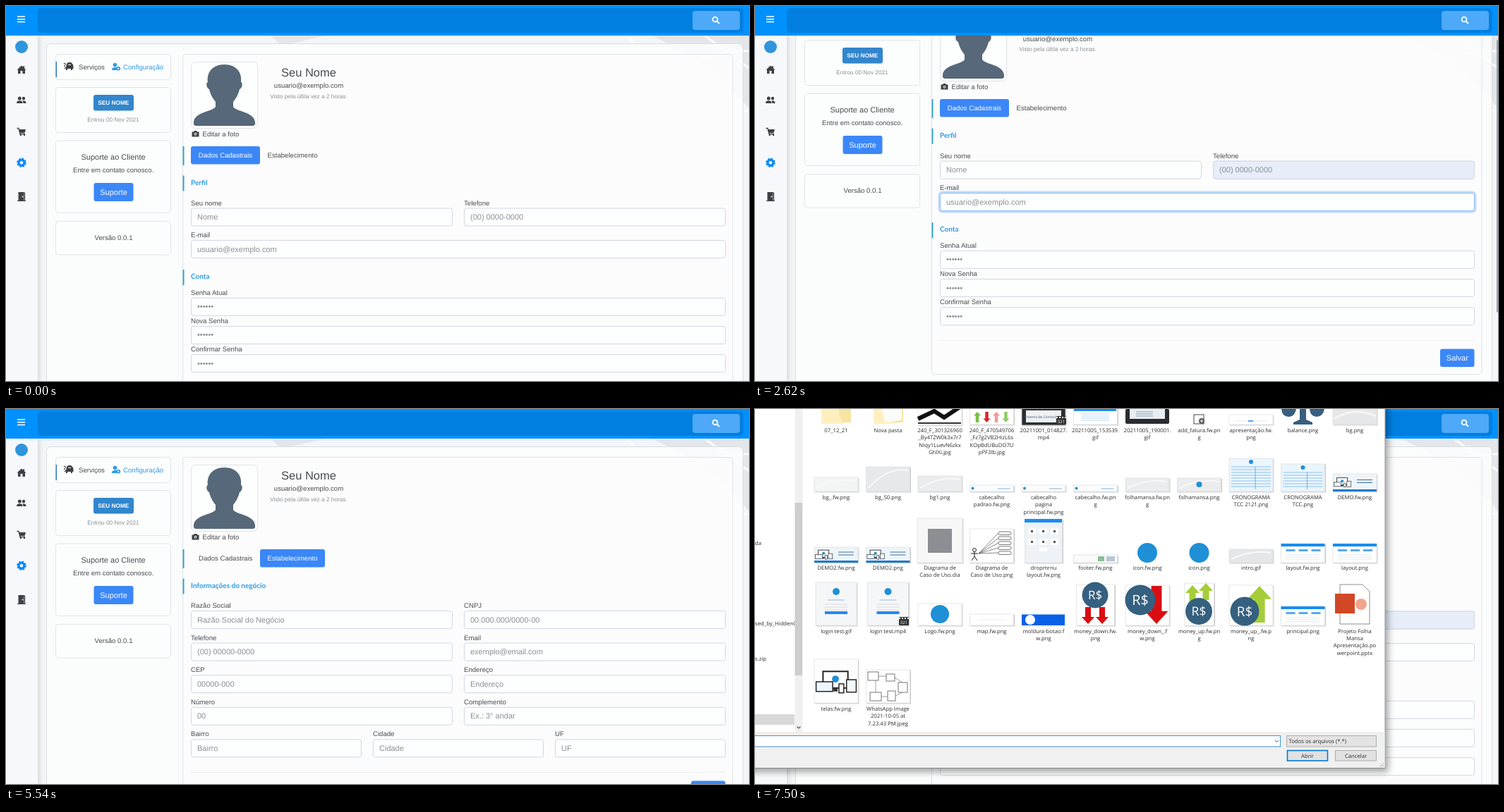
Animation, 1053 px wide and 532 px high, one loop 8000 ms. Source, as an HTML page:

```html
<!DOCTYPE html>
<html lang="pt-BR">
<head>
<meta charset="utf-8">
<title>Configuração</title>
<style>
html, body { margin: 0; width: 100%; height: 100%; overflow: hidden; background: #f4f5f7; }
svg { display: block; width: 1053px; height: 532px; font-family: "Liberation Sans", Arial, sans-serif; text-rendering: geometricPrecision; }
.head { font-family: Lato, sans-serif; font-weight: 700; }
.win { font-family: "Open Sans", "Noto Sans", sans-serif; }
</style>
</head>
<body>
<svg id="stage" viewBox="0 0 1053 532"></svg>
<script>
const LOOP = 8000;
const INK = '#494c50', MUTED = '#8b9095', BLUE = '#3b87f8', SKY = '#2e9be6', ICON = '#3d4146';

// Markup helpers
const rect = (x, y, w, h, fill, more = '') => `<rect x="${x}" y="${y}" width="${w}" height="${h}" fill="${fill}" ${more}/>`;
const path = (d, fill, more = '') => `<path d="${d}" fill="${fill}" ${more}/>`;
const line = (d, color, w = 1, more = '') => path(d, 'none', `stroke="${color}" stroke-width="${w}" ${more}`);
const disc = (x, y, r, fill, more = '') => `<circle cx="${x}" cy="${y}" r="${r}" fill="${fill}" ${more}/>`;
const text = (x, y, s, size = 9.625, fill = INK, more = '') => `<text x="${x}" y="${y}" font-size="${size}" fill="${fill}" ${more}>${s}</text>`;
const mid = (x, y, s, size, fill, more = '') => text(x, y, s, size, fill, 'text-anchor="middle" ' + more);
const group = (id, body, more = '') => `<g id="${id}" ${more}>${body}</g>`;
const box = (x, y, w, h) => rect(x + .5, y + .5, w, h, '#fcfdfd', 'rx="4" stroke="#e1e5e9"');
const bar = (y, h) => rect(250.5, y, 2, h, '#36a3d0');
const button = (x, y, w, h, s, size = 11) => rect(x, y, w, h, BLUE, 'rx="3"') + mid(x + w / 2, y + h / 2 + size * .35, s, size, '#fff');

const input = (x, y, w, hint, fill = '#fdfefe') =>
  rect(x + .5, y + .5, w - 1, 25, fill, 'rx="3" stroke="#d0d7e6"') + text(x + 9, y + 16.5, hint, 11, MUTED);
const field = (x, y, w, label, hint) => text(x, y - 4, label) + input(x, y, w, hint);
const ring = (id, x, y, w) => group(id,
  rect(x - 1, y - 1, w + 2, 28, 'none', 'rx="4.5" stroke="#c3dbfd" stroke-width="3"') +
  rect(x + .5, y + .5, w - 1, 25, 'none', 'rx="3" stroke="#8dbcfb"'));
const caret = (id, x, y) => group(id, rect(x, y + 7, 1, 12, '#444'));
const menu = (id, x, w, items) => group(id,
  rect(x, 313.5, w, 60, '#fff', 'rx="2" stroke="#c9ccd1" stroke-width=".8" filter="url(#soft)"') +
  items.map((s, i) => text(x + 9, 334 + i * 24.5, s, 8.2, '#333', 'class="win"')).join(''));

function backdrop() {
  return rect(0, 0, 1053, 532, '#f4f5f7') +
    path('M375 42H452L402 54H388ZM915 42H1053V145Q1000 80 915 42Z', '#e4e6e9') +
    line('M880 42Q960 130 1053 150M990 42L1053 88M930 110Q990 60 1053 64', '#fafbfc', 3);
}

function leftColumn() {
  const car = path('M86 82L88 80H92L95 83L95.5 86V89H94V91H92V89H87V91H85V87Z', ICON) +
    line('M82 81L85 83M82 85H84M83 89L85 87', ICON, 1.3) + line('M88 83L92 83.5', '#fcfdfd');
  const user = disc(154.5, 83.5, 2.8, SKY) + path('M150 91Q150 87 154 87H157V91Z', SKY) +
    disc(159.3, 88.6, 2, 'none', `stroke="${SKY}" stroke-width="1.7"`);
  return box(70, 68, 163, 36) + rect(70.5, 79, 1.6, 22, '#3582c4') + car + text(103, 89.5, 'Serviços') +
    user + text(166, 89.5, 'Configuração', 9.625, SKY) +
    box(70, 115, 163, 64) + rect(124, 126, 57, 22.5, '#3286cd', 'rx="3"') +
    mid(152.3, 140.3, 'SEU NOME', 8.25, '#fff', 'font-weight="700"') + mid(152, 164, 'Entrou 00 Nov 2021', 8.25, MUTED) +
    box(70, 190.5, 163, 102.5) + mid(152, 217.6, 'Suporte ao Cliente', 11) +
    mid(152.2, 236.3, 'Entre em contato conosco.') + button(124.5, 251, 56, 26, 'Suporte') +
    box(70, 305, 163, 47.5) + mid(152.5, 332.3, 'Versão 0.0.1');
}

function profileTop() {
  const bust = 'M309.5 83C326 83 335 94 333 108C336 108 335 117 331 118C329 127 325 132 322 136V143' +
    'C326 150 352 150 353 165Q354 170 349 170H270Q265 170 266 165C267 150 293 150 297 143V136' +
    'C294 132 290 127 288 118C284 117 283 108 286 108C284 94 293 83 309.5 83Z';
  const camera = path('M263.5 178.5H266L267 177H270L271 178.5H273.5V185.5H263.5Z', ICON) + disc(268.5, 181.7, 1.9, '#fff') + disc(268.5, 181.7, 1, ICON);
  const tab = (id, a, b) => group(id, a + b);
  return rect(262.5, 79.5, 94, 94, '#fdfefe', 'rx="6" stroke="#dfe2e6"') + path(bust, '#566879') +
    mid(429, 99.5, 'Seu Nome', 16.5) + mid(429, 116.4, 'usuario@exemplo.com') +
    mid(429, 130.6, 'Visto pela últila vez a 2 horas.', 8.25, MUTED) + camera + text(278.5, 184.6, 'Editar a foto') + bar(199, 27) +
    tab('tabA', button(262, 199, 98, 25.5, 'Dados Cadastrais', 9.625), text(370.5, 215.2, 'Estabelecimento')) +
    tab('tabB', text(273, 215.2, 'Dados Cadastrais'), button(360, 199, 92, 25.5, 'Estabelecimento', 9.625));
}

const heading = (y, s) => bar(y, 22) + text(262, y + 13, s, 10, SKY, 'class="head"');
const save = y => line(`M262 ${y - 12}H1019`, '#eceff2') + button(971, y, 48.5, 25.5, 'Salvar');

function userForm() {
  return heading(240.5, 'Perfil') + field(262, 286.5, 371, 'Seu nome', 'Nome') + field(649, 286.5, 371, 'Telefone', '(00) 0000-0000') +
    group('filled', input(649, 286.5, 371, '(00) 0000-0000', '#e7eefa')) +
    field(262, 332, 758, 'E-mail', 'usuario@exemplo.com') + heading(374, 'Conta') +
    ['Senha Atual', 'Nova Senha', 'Confirmar Senha'].map((s, i) => field(262, 413.7 + i * 40.2, 758, s, '••••••')).join('') +
    save(553.5) + ring('ringName', 262, 286.5, 371) + ring('ringPhone', 649, 286.5, 371) + ring('ringMail', 262, 332, 758) +
    caret('caretName', 271, 286.5) + caret('caretPhone', 658, 286.5) + caret('caretMail', 271, 332);
}

function shopForm() {
  const pairs = [['Razão Social', 'Razão Social do Negócio', 'CNPJ', '00.000.000/0000-00'],
    ['Telefone', '(00) 00000-0000', 'Email', 'exemplo@email.com'],
    ['CEP', '00000-000', 'Endereço', 'Endereço'], ['Número', '00', 'Complemento', 'Ex.: 3° andar']];
  return heading(240.5, 'Informações do negócio') +
    pairs.map(([a, b, c, d], i) => field(262, 286 + i * 45.6, 371, a, b) + field(649, 286 + i * 45.6, 371, c, d)).join('') +
    ['Bairro', 'Cidade', 'UF'].map((s, i) => field(262 + i * 258, 468.4, 242, s, s)).join('') + save(527.5);
}

function chrome() {
  const door = rect(17.5, 264, 8, 12, ICON) + line('M16 276.5H28M26.5 276V265H25', ICON, 1.2) + disc(23.5, 270.5, .9, '#fff');
  return rect(0, 42, 45, 490, '#f7f8fc', 'filter="url(#side)"') + disc(22, 58, 9, '#2f95dc') +
    path('M15.5 90.5L22 84.5L24.5 86.8V85H26V88.2L28.5 90.5H27V96H23.5V92H20.5V96H17V90.5Z', ICON) +
    disc(19.3, 131, 2.5, ICON) + path('M15 138Q15 134.3 19.3 134.3T23.6 138Z', ICON) +
    disc(25, 131, 2.2, ICON) + path('M24.5 138Q24.5 135.5 23.3 134.4Q28.5 133.8 28.5 138Z', ICON) +
    path('M18 175H28L26.5 180H19.5Z', ICON) + line('M15.5 173.5H18L20 181.5H27', ICON, 1.3) + disc(20.8, 183, 1.2, ICON) + disc(26, 183, 1.2, ICON) +
    disc(22, 222.3, 4, 'none', 'stroke="#0a8bf5" stroke-width="3.4"') +
    disc(22, 222.3, 5.8, 'none', 'stroke="#0a8bf5" stroke-width="2" stroke-dasharray="2.5 2.055"') + door +
    rect(0, 0, 1053, 42, '#0191fe') + rect(45, 3, 1000, 35, '#007fe0', 'rx="5"') + rect(973, 7, 67, 27, '#4ea9f8', 'rx="4"') +
    line('M16 15H27M16 18.7H27M16 22.4H27', '#fff', 1.5) + disc(1005, 19, 3.4, 'none', 'stroke="#fff" stroke-width="1.8"') + line('M1007.5 21.5L1011 25', '#fff', 2);
}

// File dialog
const col = i => 115 + i * 73.5;
const sheet = (x, y, w, h, fill = '#fff') => rect(x, y, w, h, fill, 'stroke="#dcdddf" stroke-width=".7" filter="url(#thumb)"');
const thumb = (i, bottom, h, fill, w = 62) => sheet(col(i) - w / 2, bottom - h, w, h, fill);
const badge = (x, y, r) => disc(x, y, r, '#1f8fd6');
const coin = (x, y, r) => disc(x, y, r, '#35607f') + mid(x, y + r * .33, 'R$', r * .92, '#fff');
const arrow = (x, y, w, h, up, fill) => {
  const s = up ? 1 : -1, a = w / 2, tip = up ? y : y + h, n = tip + s * a * 1.1, end = tip + s * h;
  return path(`M${x} ${tip}L${x + a} ${n}H${x + a * .45}V${end}H${x - a * .45}V${n}H${x - a}Z`, fill);
};
const stripes = (x, y, w, n, step, color) => Array.from({ length: n }, (_, i) => line(`M${x} ${y + i * step}h${w}`, color, 1)).join('');
const devices = (x, y, s = 1) => `<g transform="translate(${x} ${y}) scale(${s})">` +
  rect(-20, -14, 36, 24, '#fff', 'stroke="#222" stroke-width="2"') + badge(-2, -3, 5) + rect(-5, 10, 6, 5, '#333') +
  rect(-30, 1, 24, 14, '#eef6fc', 'stroke="#222" stroke-width="1.5"') + rect(14, -2, 14, 18, '#f2f8fc', 'stroke="#222" stroke-width="1.5"') +
  rect(3, 4, 7, 13, '#fff', 'stroke="#222" stroke-width="1.5"') + '</g>';
const banner = (i, y, h) => thumb(i, y, h, '#eef5fa') + devices(col(i) - 17, y - h / 2 - 1, .42) +
  stripes(col(i) + 3, y - h / 2 - 4, 22, 2, 4, '#3b6f9e') + rect(col(i) - 31, y - 3, 62, 3, '#1c79c8');
const layout = i => y => thumb(i, y, 27) + rect(col(i) - 31, y - 27, 62, 4, '#178df2') +
  [0, 1, 2].map(k => rect(col(i) - 24 + k * 18, y - 19, 13, 3, '#5ba7ee')).join('') + stripes(col(i) - 24, y - 11, 48, 3, 3, '#e3e8ee');
const login = i => thumb(i, 307, 61, '#f5f6f7', 58) + badge(col(i), 259, 5) + stripes(col(i) - 12, 271, 24, 1, 1, '#8db9df') +
  stripes(col(i) - 16, 277, 32, 3, 4, '#d6dade') + rect(col(i) - 16, 287, 32, 4, '#2489ee');
const clip = (x, y) => rect(x, y, 14, 12, '#333', 'rx="1"') + line(`M${x} ${y + 2}h14`, '#fff', 2, 'stroke-dasharray="2 2"') + mid(x + 7, y + 10, '321', 6, '#fff');
const table = (i, h) => thumb(i, 117, h, '#eaf5fd') + badge(col(i), 117 - h + 5, 3) +
  stripes(col(i) - 28, 117 - h + 12, 56, Math.floor((h - 14) / 4), 4, '#8cc3ec') + line(`M${col(i) + 6} ${129 - h}V114`, '#5d9fd0', .8);

function thumbsTop() {
  const fold = x => path(`M${x} 0H${x + 42}V19L${x + 5} 21Z`, '#f8e3a2') + path(`M${x} 0H${x + 24}L${x + 30} 21H${x}Z`, '#ffefbf');
  return fold(94) + fold(168) + path('M180 0H208V16L184 19Z', '#fbfbf8') +
    thumb(2, 23, 30) + line('M231 14L254 3L268 12L292 -4', '#111', 6) + line('M231 20H292', '#333', 2) +
    thumb(3, 22, 30) + [0, 1, 2, 3].map(k => arrow(315 + k * 13.5, 4, 10, 15, k % 2 == 0, k == 0 || k == 2 ? (k ? '#f29a9a' : '#78c043') : (k == 1 ? '#d8262c' : '#8dcc68'))).join('') +
    thumb(4, 23, 30, '#2c2e31') + rect(384, 2, 50, 17, '#eef2f5') + mid(405, 13, 'Sistema de Controle', 5, '#456') + clip(427, 10) +
    thumb(5, 22, 30) + rect(452, 0, 60, 3, '#178df2') + stripes(462, 7, 40, 4, 3, '#bcd9f3') +
    rect(525, 0, 62, 21, '#2a2c2f', 'rx="2"') + rect(531, 0, 50, 14, '#e8edf1') + stripes(540, 4, 24, 3, 3, '#8fa2b3') +
    rect(622, 8, 14, 13, '#fff', 'stroke="#444"') + disc(633, 17, 4, '#555') + line('M630.5 17h5M633 14.5v5', '#fff') +
    thumb(8, 22, 14) + stripes(680, 17, 46, 1, 1, '#e5e9ef') + rect(699, 16, 7, 2, '#4f9fe8') +
    path('M772 0H781V15L790 19V22H763V19L772 15Z', '#365f80') + path('M746 0H767Q765 11 756 11T746 0ZM786 0H807Q805 11 796 11T786 0Z', '#365f80') +
    thumb(10, 22, 34, '#e6e7e8') + line('M820 14Q850 -4 880 10', '#f4f4f4', 3);
}

function thumbsMiddle() {
  const pale = (i, y, h, f = '#ebeced') => thumb(i, y, h, f) + line(`M${col(i) - 28} ${y - 5}Q${col(i)} ${y - h} ${col(i) + 28} ${y - h + 5}`, '#f8f8f8', 2);
  const actor = disc(311, 200, 2.5, 'none', 'stroke="#222"') + line('M311 202V209L307 215M311 209L315 215M306 205H316', '#222') +
    [0, 1, 2, 3, 4].map(k => line(`M317 205L345 ${176 + k * 7}`, '#555', .7) + rect(345, 174 + k * 7, 18, 4.5, '#fff', 'rx="2" stroke="#444" stroke-width=".7"')).join('');
  const head = [3, 4, 5].map(i => thumb(i, 117, 9, '#fbfcfd') + badge(col(i) - 27, 112.5, 2) + stripes(col(i) + 8, 113, 18, 1, 1, '#79b5ea')).join('');
  const tiles = Array.from({ length: 6 }, (_, k) => rect(387 + k % 3 * 16, 169 + Math.floor(k / 3) * 15, 11, 9, '#fff') + rect(391 + k % 3 * 16, 172 + Math.floor(k / 3) * 15, 3, 3, '#555')).join('');
  return pale(0, 117, 20, '#f3f4f4') + pale(1, 117, 35, '#e7e8e9') + pale(2, 117, 22) + head + pale(6, 117, 19) + pale(7, 117, 19) + badge(col(7), 107, 4) +
    table(8, 47) + table(9, 39) + banner(10, 117, 25) +
    banner(0, 218, 22) + banner(1, 218, 22) + sheet(230, 155, 64, 63, '#f7f7f7') + rect(245, 170, 34, 34, '#8b8f94') +
    thumb(3, 218, 48) + actor + thumb(4, 218, 62, '#eef2f6', 53) + rect(382, 156, 53, 5, '#178df2') + tiles + rect(403, 197, 11, 5, '#fff') +
    thumb(5, 218, 11, '#fafafa') + rect(486, 209, 9, 7, '#8bbd96') + rect(498, 209, 12, 7, '#b7c6d2') +
    badge(col(6), 204, 14) + badge(col(7), 204, 14) + pale(8, 218, 19, '#e5e6e7') + layout(9)(218) + layout(10)(218);
}

function thumbsLow() {
  const red = '#d90e12', green = '#a5cd39';
  const nodes = rect(160, 373, 15, 12, '#fff') + rect(186, 376, 12, 10, '#fff') + rect(203, 388, 13, 14, '#fff') + rect(163, 402, 16, 12, '#fff') + rect(188, 400, 11, 14, '#fff');
  return login(0) + login(1) + clip(204, 295) + thumb(2, 307, 31) + badge(col(2), 291, 13) + thumb(3, 307, 16) + stripes(316, 299, 40, 1, 1, '#eceff2') +
    rect(378, 291.5, 61, 15.5, '#0961e6') + disc(390, 299, 7, '#fff') +
    thumb(5, 307, 58, '#fff', 54) + arrow(472, 281, 18, 24, false, red) + arrow(492, 281, 18, 24, false, red) + coin(482, 264, 18.5) +
    thumb(6, 307, 57) + arrow(569, 251, 33, 54, false, red) + coin(546, 271, 21.5) +
    thumb(7, 307, 60, '#fff', 42) + arrow(620, 250, 20, 24, true, green) + arrow(639, 247, 20, 24, true, green) + coin(629, 287, 19) +
    thumb(8, 307, 57) + arrow(715, 251, 34, 52, true, green) + coin(694, 287, 20.5) + layout(9)(307) +
    path('M829 249H861L871 259V305H829Z', '#fff', 'stroke="#8e8e8e"') + disc(859, 277, 8, '#f2a48c') + rect(822, 262, 28, 28, '#d24726') +
    thumb(0, 417, 62, '#fdfdfd') + devices(116, 386, .98) + thumb(1, 417, 47) + `<g stroke="#555" stroke-width=".8">${nodes}</g>` +
    line('M175 379H186M198 381L209 388M171 385V402M179 408H188M199 407L209 402', '#777', .7);
}

const captions = [
  [32.8, '07_12_21', 'Nova pasta', '240_F_301326960|_By4TZW0k3x7r7|NIqy1LuevN6zkx|GhlXi.jpg', '240_F_470549706|_Fz7g2VB2HizL6s|KOpBdUBuDO7U|pPF3Ib.jpg',
    '20211001_014827.|mp4', '20211005_153539.|gif', '20211005_190001.|gif', 'add_fatura.fw.pn|g', 'apresentação.fw.|png', 'balance.png', 'bg.png'],
  [127.8, 'bg_.fw.png', 'bg_50.png', 'bg1.png', 'cabecalho|padrao.fw.png', 'cabecalho|pagina|principal.fw.png', 'cabecalho.fw.pn|g',
    'folhamansa.fw.pn|g', 'folhamansa.png', 'CRONOGRAMA|TCC 2121.png', 'CRONOGRAMA|TCC.png', 'DEMO.fw.png'],
  [227.8, 'DEMO2.fw.png', 'DEMO2.png', 'Diagrama de|Caso de Uso.dia', 'Diagrama de|Caso de Uso.png', 'dropmrnu|layout.fw.png', 'footer.fw.png',
    'icon.fw.png', 'icon.png', 'intro.gif', 'layout.fw.png', 'layout.png'],
  [317.6, 'login test.gif', 'login test.mp4', 'Logo.fw.png', 'map.fw.png', 'moldura-botao.f|w.png', 'money_down.fw.|png', 'money_down_.f|w.png',
    'money_up.fw.pn|g', 'money_up_.fw.p|ng', 'principal.png', 'Projeto Folha|Mansa|Apresentação.po|werpoint.pptx'],
  [427.8, 'telas.fw.png', 'WhatsApp Image|2021-10-05 at|7.23.43 PM.jpeg']
];

function dialog() {
  const dark = '#2c2c2c', frame = 'stroke="#adadad"';
  const names = captions.map(([y, ...row]) => row.map((s, i) =>
    s.split('|').map((part, k) => mid(col(i), y + k * 10.4, part, 7.7, dark)).join('')).join('')).join('');
  return rect(-60, -60, 953, 569.5, '#fff', 'filter="url(#drop)" stroke="#8a8d90"') + rect(-60, 458, 952.5, 51, '#f0f0f0') +
    text(0, 192.8, 'da', 7.7, dark) + text(0, 306.8, 'sed_by_HiddenQ', 7.7, dark) + text(0, 356.5, 's.zip', 7.7, dark) +
    rect(-60, 433, 116, 15, '#d9d9d9') + rect(56.5, -60, 11, 518, '#f0f0f0') + rect(56.5, 133, 10.5, 245, '#cdcdcd') +
    line('M59.5 450.5L62 453L64.5 450.5', '#555', 1.2) + thumbsTop() + thumbsMiddle() + thumbsLow() + names +
    rect(-60, 463.5, 804.5, 15.5, '#fff', 'stroke="#3d93dc"') + line('M737 470L739.5 472.5L742 470M872.5 470L875 472.5L877.5 470', '#555') +
    rect(753.5, 463.5, 127, 15.5, '#e3e3e3', frame) + text(756.5, 474, 'Todos os arquivos (*.*)', 7.7, dark) +
    rect(754.5, 484.5, 57, 14.5, '#e1e1e1', 'stroke="#0078d7" stroke-width="1.6"') + mid(783, 494.6, 'Abrir', 7.7, dark) +
    rect(822.5, 484.5, 58, 14.5, '#e1e1e1', frame) + mid(851.5, 494.6, 'Cancelar', 7.7, dark) +
    line('M885 508L891 502M888 508L891 505', '#b5b5b5');
}

const shadow = (id, dx, dy, blur, a) => `<filter id="${id}" x="-20%" y="-20%" width="140%" height="150%"><feDropShadow dx="${dx}" dy="${dy}" stdDeviation="${blur}" flood-opacity="${a}"/></filter>`;
const stage = document.getElementById('stage');
stage.innerHTML = '<defs>' + shadow('soft', 0, 1, 1.5, .22) + shadow('side', 2, 0, 3, .14) + shadow('thumb', 1, 1, .7, .25) + shadow('drop', 4, 5, 5, .35) + '</defs>' +
  backdrop() +
  group('page', rect(57.5, 53.5, 987, 552, '#fcfdfd', 'rx="6" fill-opacity=".9" stroke="#dadee2"') + leftColumn() +
    rect(250.5, 68.5, 779.5, 521, '#fdfdfd', 'rx="4" fill-opacity=".7" stroke="#dfe3e8"') + profileTop() +
    group('user', userForm()) + group('shop', shopForm()) +
    menu('menuName', 262, 129, ['peças', 'p']) + menu('menuPhone', 648, 131.5, ['(00) 0000-12345', '45'])) +
  chrome() + group('thumbBar', rect(1051, 1, 2, 386, '#9aa1a8')) + group('dialog', dialog(), 'class="win"');

// Opacity over time: [ms, value] pairs, linear in between
const fades = {
  ringName: [[480, 0], [630, 1], [1270, 1], [1420, 0]],
  ringPhone: [[1270, 0], [1400, 1], [1810, 1], [1960, 0]],
  ringMail: [[1810, 0], [1960, 1], [4540, 1], [4690, 0]],
  menuName: [[490, 0], [740, 1], [1270, 1], [1450, 0]],
  menuPhone: [[1270, 0], [1400, 1], [1810, 1], [2040, 0]],
  filled: [[1829, 0], [1830, 1]],
  caretName: [[499, 0], [500, 1], [999, 1], [1000, 0]],
  caretPhone: [[1289, 0], [1290, 1], [1829, 1], [1830, 0]],
  caretMail: [[1829, 0], [1830, 1], [2369, 1], [2370, 0], [2909, 0], [2910, 1], [3409, 1], [3410, 0], [3999, 0], [4000, 1], [4499, 1], [4500, 0]],
  thumbBar: [[2360, 0], [2370, 1], [2890, 1], [3410, 0], [3990, 0], [4000, 1], [4480, 1], [4900, 0]],
  tabA: [[4540, 1], [4690, 0], [5830, 0], [5980, 1]],
  tabB: [[4540, 0], [4690, 1], [5830, 1], [5980, 0]],
  user: [[4560, 1], [4800, 0], [6012, 0], [6262, 1]],
  shop: [[4808, 0], [5058, 1], [5820, 1], [6005, 0]],
  dialog: [[7100, 0], [7400, 1]]
};
const parts = Object.fromEntries([...Object.keys(fades), 'page'].map(id => [id, document.getElementById(id)]));

const ramp = (t, a, b) => Math.min(1, Math.max(0, (t - a) / (b - a)));
const smooth = p => (1 - Math.cos(Math.PI * p)) / 2;
function valueAt(keys, t) {
  let last = keys[0];
  for (const key of keys) {
    if (t < key[0]) return last[1] + (key[1] - last[1]) * ramp(t, last[0], key[0]);
    last = key;
  }
  return last[1];
}

function draw(t) {
  for (const id in fades) {
    const v = valueAt(fades[id], t);
    parts[id].setAttribute('opacity', v);
    parts[id].style.display = v ? '' : 'none';
  }
  const scroll = 67.5 * (smooth(ramp(t, 2330, 2640)) - smooth(ramp(t, 4010, 4260)));
  parts.page.setAttribute('transform', `translate(0 ${-scroll})`);
  parts.thumbBar.setAttribute('transform', `translate(0 ${scroll * .71})`);
  const zoom = 1 - .08 * (1 - ramp(t, 7100, 7480)) ** 3;
  parts.dialog.setAttribute('transform', `translate(420 220) scale(${zoom}) translate(-420 -220)`);
}

const start = performance.now();
function tick() {
  draw((performance.now() - start) % LOOP);
  requestAnimationFrame(tick);
}
tick();
</script>
</body>
</html>
```
